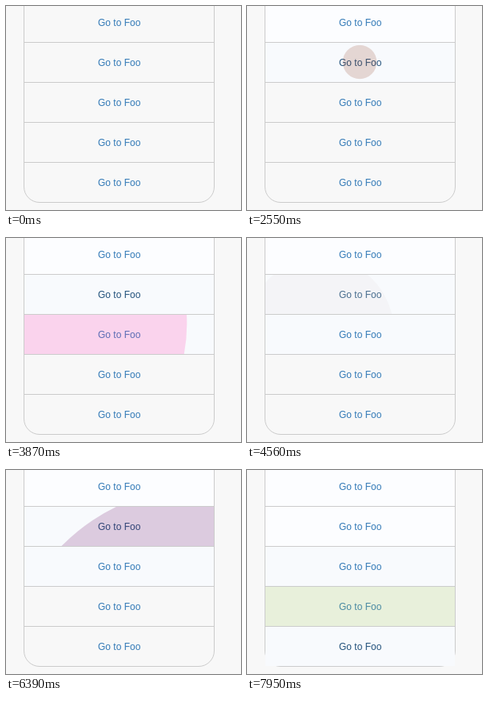
An HTML page for the animation above (8000 ms loop, 294 by 255 pixels).

```html
<!DOCTYPE html>
<html lang="en">
<head>
<meta charset="utf-8">
<title>Ripple list</title>
<style>
html, body { margin: 0; width: 100%; height: 100%; overflow: hidden; background: #f8f8f8; }
body { position: relative; font: 12px/16px "Liberation Sans", Arial, sans-serif; }

.list {
  position: absolute; left: 22px; top: -60px; width: 239px; height: 306px;
  box-sizing: border-box; border: 1px solid #ccc; border-radius: 20px;
}
.row {
  position: absolute; left: 23px; width: 237px; height: 50px;
  box-sizing: border-box; border-top: 1px solid #ccc; overflow: hidden;
}
.row:nth-of-type(2) { top: -5px; }
.row:nth-of-type(3) { top: 45px; }
.row:nth-of-type(4) { top: 95px; }
.row:nth-of-type(5) { top: 145px; }
.row:nth-of-type(6) { top: 195px; }
.row span { position: absolute; left: 92px; top: 17px; white-space: nowrap; color: #337ab7; }

/* hover states: 1% = 80ms */
.row, .row span { animation: 8s step-end infinite; }
.r1 { animation-name: bg1; }
.r2 { animation-name: bg2; }
.r3 { animation-name: bg3; }
.r4 { animation-name: bg4; }
.r5 { animation-name: bg5; }
.r1 span { animation-name: hover1; }
.r2 span { animation-name: hover2; }
.r3 span { animation-name: hover3; }
.r4 span { animation-name: hover4; }
.r5 span { animation-name: hover5; }

@keyframes bg1 { 7.875% { background: #f8fafd; } 25.5%, 100% { background: #fcfdff; } }
@keyframes bg2 { 3% { background: #f8fafd; } 88.125%, 100% { background: #fcfdff; } }
@keyframes bg3 { 36.75%, 100% { background: #f8fafd; } }
@keyframes bg4 { 83.25%, 100% { background: #f8fafd; } }
@keyframes bg5 { 97.5%, 100% { background: #f8fafd; } }

@keyframes hover1 { 7.875% { color: #23527c; } 19.5%, 100% { color: #337ab7; } }
@keyframes hover2 {
  3%, 19.5%, 45% { color: #23527c; }
  7.875%, 36.75%, 81.75%, 100% { color: #337ab7; }
}
@keyframes hover3 {
  36.75%, 81.75% { color: #23527c; }
  45%, 83.25%, 100% { color: #337ab7; }
}
@keyframes hover4 { 83.25% { color: #23527c; } 97.5%, 100% { color: #337ab7; } }
@keyframes hover5 { 97.5%, 100% { color: #23527c; } }

/* ripples */
.ripple {
  position: absolute; left: 0; top: -1px; width: 237px; height: 50px;
  opacity: .2; clip-path: circle(0 at var(--at));
  animation: 8s linear infinite;
}
.grey { --at: 69px 71px; background: #dedddb; animation-name: grey; }
.late { animation-delay: -5.06s; }
.brown { --at: 118px 25px; background: #944630; animation-name: brown; }
.pink { --at: -3px 12px; background: #ff37a8; animation-name: pink; }
.violet { --at: 224px 225px; background: #1c28f8; animation-name: violet; }
.green { --at: 118px 25px; background: #a3c853; animation-name: green; }

@keyframes grey {
  0%, 16.125% { clip-path: circle(0px at var(--at)); }
  17.625% { clip-path: circle(56px at var(--at)); }
  20.25% { clip-path: circle(91px at var(--at)); }
  24.375% { clip-path: circle(260px at var(--at)); opacity: .2; }
  25.5% { opacity: 0; }
  100% { clip-path: circle(260px at var(--at)); opacity: 0; }
}
@keyframes brown {
  0%, 30.75% { clip-path: circle(0px at var(--at)); }
  37.5%, 100% { clip-path: circle(126px at var(--at)); }
  40.5% { opacity: .2; }
  41.625%, 100% { opacity: 0; }
}
@keyframes pink {
  0%, 40.5% { clip-path: circle(0px at var(--at)); }
  48.375% { clip-path: circle(206px at var(--at)); }
  49.875%, 100% { clip-path: circle(246px at var(--at)); }
  51.75% { opacity: .2; }
  52.875%, 100% { opacity: 0; }
}
@keyframes violet {
  0%, 69% { clip-path: circle(0px at var(--at)); }
  69.375% { clip-path: circle(176px at var(--at)); }
  70.875% { clip-path: circle(221px at var(--at)); }
  71.625% { clip-path: circle(231px at var(--at)); }
  77.25% { clip-path: circle(231px at var(--at)); background: #1c28f8; }
  79.875% { clip-path: circle(249px at var(--at)); background: #6c0f67; }
  84.375%, 100% { clip-path: circle(320px at var(--at)); background: #6c0f67; }
  87% { opacity: .2; }
  88.125%, 100% { opacity: 0; }
}
@keyframes green {
  0%, 93% { clip-path: circle(0px at var(--at)); }
  98.75%, 100% { clip-path: circle(126px at var(--at)); }
}
</style>
</head>
<body>
<div class="list"></div>
<div class="row r1"><span>Go to Foo</span><i class="ripple grey"></i></div>
<div class="row r2">
  <span>Go to Foo</span>
  <i class="ripple brown"></i><i class="ripple grey late"></i><i class="ripple violet"></i>
</div>
<div class="row r3"><span>Go to Foo</span><i class="ripple pink"></i></div>
<div class="row r4"><span>Go to Foo</span><i class="ripple green"></i></div>
<div class="row r5"><span>Go to Foo</span></div>
</body>
</html>
```
